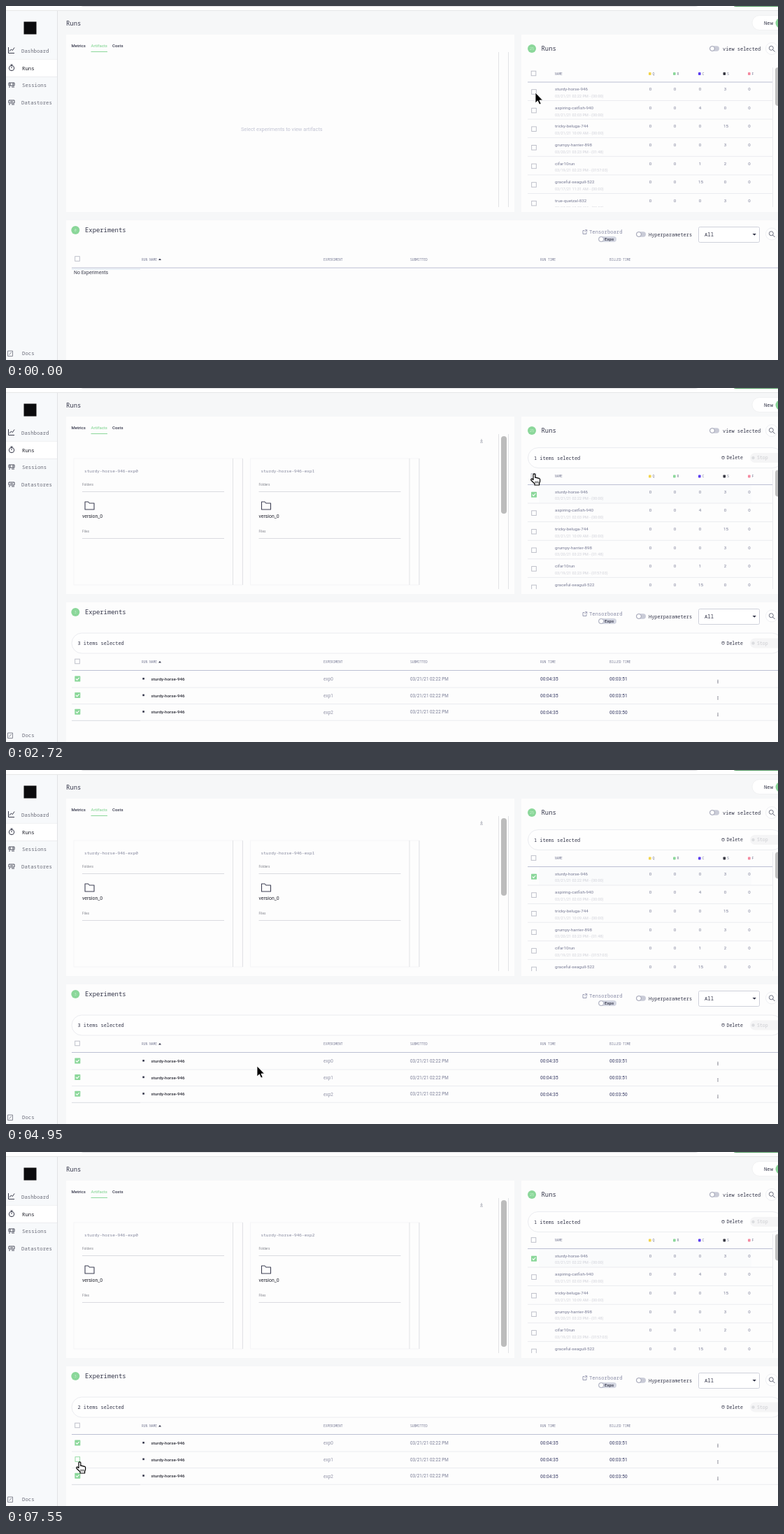
Recreate the animation shown at these times as an HTML page. Size 1104 by 507 pixels, loop 8000 ms.

```html
<!DOCTYPE html>
<html lang="en">
<head>
<meta charset="utf-8">
<style>
  html, body { margin: 0; width: 100%; height: 100%; overflow: hidden; background: #f6f7f8; }
  svg { display: block; width: 1104px; height: 507px; }
  text { font-family: Roboto, Inter, sans-serif; white-space: pre; }
  .m { font-family: "Noto Sans Mono", "DejaVu Sans Mono", monospace; }
  .b { font-weight: 500; }
  .c { text-anchor: middle; }
</style>
</head>
<body>
<svg id="stage" viewBox="0 0 1104 507"></svg>
<script>
const INK = '#34364a', SOFT = '#787b95', PALE = '#cfd0d8', GREEN = '#8bd79a', EDGE = '#ebecf0';
const STEP = 117.65, LOOP = 8000;

// Drawing helpers; text is placed by its vertical centre.
const text = (x, y, s, size, fill = INK, cls = '', id = '') =>
  `<text id="${id}" x="${x}" y="${y + size * .36}" font-size="${size}" fill="${fill}" class="${cls}">${s}</text>`;
const rect = (x, y, w, h, fill, extra = '') =>
  `<rect x="${x}" y="${y}" width="${w}" height="${h}" fill="${fill}" ${extra}/>`;
const path = (d, stroke, w = 1, fill = 'none', extra = '') =>
  `<path d="${d}" stroke="${stroke}" stroke-width="${w}" fill="${fill}" ${extra}/>`;
const circle = (x, y, r, fill, extra = '') => `<circle cx="${x}" cy="${y}" r="${r}" fill="${fill}" ${extra}/>`;
const hline = (x, y, x2, color, w = 1) => path(`M${x} ${y}H${x2}`, color, w);
const vline = (x, y, y2, color, w = 1) => path(`M${x} ${y}V${y2}`, color, w);
const group = (id, body, extra = '') => `<g id="${id}" ${extra}>${body}</g>`;
const box = (x, y, color = '#b7b9c4') => rect(x - 3.3, y - 3.3, 6.6, 6.6, '#fff', `stroke="${color}" stroke-width=".9"`);
const ticked = (x, y) => rect(x - 4, y - 4, 8, 8, GREEN, 'rx=".6"') +
  path(`M${x - 2.3} ${y}l1.7 1.7 3-3.4`, '#fff', 1.1);
const toggle = (x, y) => rect(x, y - 3.7, 14, 7.4, '#c9cbd7', 'rx="3.7"') +
  circle(x + 4, y, 3.4, '#fff', 'stroke="#8d90a5" stroke-width=".8"');
const search = y => circle(1095, y, 8.5, '#fff', 'stroke="#eff0f3"') +
  circle(1094.3, y - .7, 3, 'none', 'stroke="#5d6072" stroke-width=".9"') +
  path(`M1096.5 ${y + 1.5}l3 3`, '#5d6072');
const badge = (x, y, r, id, s) => circle(x, y, r, GREEN) + text(x, y, s, 5, '#c9f2d0', 'm c', id);

function sidebar() {
  const items = [['Dashboard', 22, 64], ['Runs', 23, 89], ['Sessions', 23, 113.5], ['Datastores', 22, 138], ['Docs', 23, 497.5]];
  const icon = '#3b3d4d';
  return rect(0, 7, 73, 500, '#f7f9fb') + vline(73.5, 7, 507, '#e1e2e5') +
    rect(0, 76, 73, 25, '#fff') + hline(0, 101.5, 73, EDGE) + hline(0, 76.5, 73, '#f1f2f4') +
    rect(25.5, 22.5, 18, 18, '#0c0c0e') +
    items.map(([s, x, y], i) => text(x, y, s, 7.3, i == 1 ? '#1e1f29' : '#6a6c79', 'm')).join('') +
    path('M3.5 59V67.5H12M5 65l2.4-3 2 1.5 2.6-4', icon) +
    circle(8, 89, 3.7, 'none', `stroke="${icon}"`) + path('M6.5 84h3M8 84v1.5M8 89V86.7', icon) +
    path('M4 110h8v4h-8zM4 116h2m2 0h4M6 110v4m4-4v4', icon, .9) +
    path('M4 135h8v4h-8zM4 141h2m2 0h4M6 137h4', icon, .9) +
    path('M2.5 494h7v7.5h-7zM4.5 499.5l3.5-4', '#7b7d89', .9);
}

function header() {
  return rect(0, 0, 1104, 6, '#fff') + hline(0, 6.5, 1104, '#e6e7e8') +
    path('M107-1q1 1.5 4 1.5H985q4 0 5-1.5', '#dcdddf') + path('M1040-1q1 1.5 4 1.5H1104', '#4f9a5e') +
    text(86, 24.5, 'Runs', 8.9, INK, 'm') +
    rect(1067, 13.5, 60, 21, '#fff', 'rx="10.5" stroke="#f1f2f3"') +
    text(1084, 24.5, 'New', 7.2, INK, 'm b') + circle(1108, 24.5, 7.5, GREEN);
}

function card(x, label, id) {
  const rule = y => hline(x + 12, y, x + 215, '#dadbe0');
  return rect(x, 101, 241, 181, '#fdfdfd', 'stroke="#f5f5f7"') +
    vline(x + 227.5, 101, 282, '#e2e3e6') + vline(x + 241.5, 101, 282, '#e2e3e6') +
    text(x + 15, 119, label, 6.1, '#84879d', 'm', id) +
    text(x + 12, 138.5, 'Folders', 4.8, '#85878f') + rule(148.5) +
    path(`M${x + 16} 163h4.5l1.8 2h6.7v9h-13z`, '#3f4155', 1.1, 'none', 'stroke-linejoin="round"') +
    text(x + 12, 183.7, 'version_0', 6.9, '#22232e') +
    text(x + 12, 205.5, 'Files', 4.8, '#85878f') + rule(215.5);
}

function artifacts() {
  return rect(86, 41, 641, 254, '#fdfdfd') +
    text(93.5, 57, 'Metrics', 6, INK, 'b') + text(121.5, 57, 'Artifacts', 6, GREEN, 'b') +
    text(152, 57, 'Costs', 6, INK, 'b') + hline(121.5, 65.5, 145, GREEN) +
    vline(704.5, 66, 288, '#e2e3e6') + vline(718.5, 66, 288, '#e2e3e6') +
    group('empty', text(336, 176.5, 'Select experiments to view artifacts', 7.35, '#c1c3d3')) +
    group('cards', card(97, 'sturdy-horse-946-exp0', '') + card(349.5, 'sturdy-horse-946-exp1', 'second') +
      path('M680 73v3.5m-1.5-1.5l1.5 1.5 1.5-1.5M678 78h4', '#9a9caa', .8) +
      rect(708, 69, 8, 111, '#bcbcbc', 'rx="4" id="thumb"'));
}

const selectionBar = (x, y, w, textX, id, n) =>
  rect(x, y, w, 29, '#fefefe', `rx="14.5" stroke="${EDGE}"`) +
  text(textX, y + 14.7, `${n} items selected`, 6.9, INK, 'm', id) +
  circle(1025.5, y + 14.5, 1.8, 'none', `stroke="${INK}" stroke-width=".7"`) + hline(1023.5, y + 12.7, 1027.5, INK, .6) +
  text(1030.5, y + 14.2, 'Delete', 6.5, INK, 'm') +
  rect(1064, y + 7.5, 50, 14, '#f5f5f6', 'rx="7"') +
  circle(1068.5, y + 14.5, 2.2, '#dcdde0') + text(1074, y + 14.2, 'Stop', 6.5, '#cbccd0', 'm');

const RUNS = [
  ['sturdy-horse-946', '03/21/21 02:22 PM - (00:00)', 0, 0, 0, 3, 0],
  ['aspiring-catfish-940', '03/21/21 02:03 PM - (00:00)', 0, 0, 4, 0, 0],
  ['tricky-beluga-744', '03/21/21 10:09 AM - (00:00)', 0, 0, 0, 15, 0],
  ['grumpy-harrier-898', '03/20/21 03:23 PM - (01:48)', 0, 0, 0, 3, 0],
  ['cifar10run', '03/19/21 02:23 PM - (0157:03)', 0, 0, 1, 2, 0],
  ['graceful-seagull-522', '03/17/21 11:31 AM - (00:00)', 0, 0, 15, 0, 0],
  ['true-quetzal-832', '03/17/21 10:58 AM - (00:00)', 0, 0, 0, 3, 0]
];

function runRow([name, date, ...counts], i) {
  const y = 119 + i * 26.6;
  return (i ? '' : rect(762, 109.5, 304, 26, '#fafbfc', 'id="hover"')) +
    hline(746, y + 16.5, 1096, EDGE) +
    (i ? box(755, y + 4) : group('firstBox', '')) +
    text(785, y, name, 6.25, SOFT) + text(785, y + 10, date, 5.5, PALE) +
    counts.map((n, k) => text([921.5, 956.5, 992.5, 1028.5, 1063][k] + (n > 9 ? 1 : 0), y, n, 6.2, SOFT, 'c')).join('');
}

function runs() {
  const legend = [['Q', 919, '#f3d44c'], ['R', 954, GREEN], ['C', 990, '#5b3df0'], ['S', 1025.5, '#3a3b45'], ['F', 1061, '#f58aa0']];
  return rect(737, 41, 367, 254, '#fdfdfd') + badge(752, 61, 6, '', '25') +
    text(765.5, 61, 'Runs', 8.9, INK, 'm') + toggle(1006, 61) +
    text(1025, 61.5, 'view selected', 6.95, INK, 'm') + search(61) +
    `<clipPath id="clip"><rect x="737" y="80" width="367" height="208"/></clipPath>` +
    group('', group('runTable',
      RUNS.map(runRow).join('') + box(754.5, 96.5) + text(785, 97, 'NAME', 4.5, SOFT, 'm b') +
      legend.map(([s, x, c]) => rect(x, 95, 3.6, 4, c, 'rx=".8"') + text(x + 5.5, 97, s, 5, SOFT, 'm')).join('') +
      hline(746, 109, 1096, '#bcc0d4', 1.2) + vline(1096.5, 88, 288, EDGE) +
      rect(1100, 88, 8, 55, '#c1c1c1', 'rx="4" id="runThumb"')), 'clip-path="url(#clip)"') +
    group('runBar', selectionBar(746.5, 85.5, 364, 755, '', 1));
}

function expRow(i) {
  const y = 417 + i * 23.6;
  return (i == 1 ? group('midBox', '') : ticked(102.3, y - .5)) +
    rect(195.3, y - 2, 2.6, 2.6, INK) + text(207.5, y, 'sturdy-horse-946', 6.25, '#2a2b36', 'b') +
    text(454, y, 'exp' + i, 6.5, '#9496aa') + text(578, y, '03/21/21 02:22 PM', 6.3, SOFT) +
    text(764, y, '00:04:35', 6.5, '#5c5f80', 'b') + text(863, y, i < 2 ? '00:03:51' : '00:03:50', 6.5, '#5c5f80', 'b') +
    [1.6, 3.4, 5.2].map(d => circle(1018, y + d, .6, INK)).join('') +
    hline(94, y + 12, 1104, EDGE);
}

function experiments() {
  const columns = [['RUN NAME', 194], ['EXPERIMENT', 454], ['SUBMITTED', 578], ['RUN TIME', 764], ['BILLED TIME', 863]];
  return rect(86, 307, 1018, 200, '#fdfdfd') + badge(99.3, 321, 6, 'expCount', '0') +
    text(113, 321, 'Experiments', 8.9, INK, 'm') +
    path('M827.5 321.5h-2.5v5h5V324M828 320.7h2.7v2.7M830.7 320.7l-3.2 3.2', '#8487a3', .8) +
    text(834, 323.5, 'Tensorboard', 7.2, '#888ba6', 'm') +
    rect(847, 330, 26, 8, '#d3d6e1', 'rx="4"') + circle(851.2, 334, 3.5, '#fff', 'stroke="#8d90a5" stroke-width=".7"') +
    text(856, 334, 'Exps', 6.2, INK, 'b') +
    toggle(901, 327) + text(919, 327.5, 'Hyperparameters', 6.9, INK, 'm') +
    rect(990.5, 316.5, 87, 22, '#fff', 'rx="2" stroke="#cfd1db"') + text(999, 327.5, 'All', 7.2, INK, 'm') +
    `<path d="M1067.5 326h5.4l-2.7 2.8z" fill="${INK}"/>` + search(326.5) +
    group('expTable', box(102, 362) + columns.map(([s, x]) => text(x, 363, s, 4.6, SOFT, 'm b')).join('') +
      `<path d="M218 364h4l-2-2.4z" fill="${INK}"/>` +
      hline(94, 375, 1104, '#bcc0d4', 1.2)) +
    group('noExps', hline(94, 377, 192, '#dbe8f3') + text(97, 381.5, 'No Experiments', 6.95, '#3b3d4d')) +
    group('expRows', selectionBar(94, 351, 1016, 102.5, 'expText', 3) + [0, 1, 2].map(expRow).join('') +
      hline(94, 476.5, 192, '#dfe1e5'));
}

const pointers =
  group('arrow', path('M0 0V15L3.4 11.8 5.7 17 8.2 16 5.9 11H10.5Z', '#fff', .8, '#000')) +
  group('hand', path('M4 1.8q1.4-1.8 2.8 0V6.5q1-.7 2.2.3 1.1-.5 2 .5 2-.4 2.6 1.5V12l-1 2.5V17H6V15L1 10.2q-.8-2 1-2.2L4 9.5Z', '#000', 1.2, '#fff', 'stroke-linejoin="round"') +
    path('M7 11.5v3M9 11.5v3M11 11.5v3', '#000', .8));

const stage = document.getElementById('stage');
stage.innerHTML = rect(0, 0, 1104, 507, '#f6f7f8') + header() + sidebar() + artifacts() + runs() + experiments() + pointers;
const $ = id => document.getElementById(id);
const show = (id, on) => $(id).setAttribute('visibility', on ? 'visible' : 'hidden');

// Pointer route: step, x, y.
const ROUTE = [
  [0, 757, 124], [2, 759, 125], [4, 759, 125], [6, 774, 125], [8, 755, 122], [10, 763, 124], [13, 763, 124],
  [17, 750, 120], [19, 750, 122], [25, 750, 122], [29, 769, 148], [31, 762, 159], [32, 750, 168],
  [34, 745, 185], [36, 714, 236], [37, 695, 252], [38, 560, 330], [39, 406, 414], [40, 398, 418], [41, 398, 418],
  [43, 320, 430], [45, 165, 430], [46, 127, 423], [48, 105, 420], [50, 99, 421], [54, 99, 421],
  [57, 99, 446], [58, 99, 446], [60, 100, 443], [99, 100, 443]
];

function pointerAt(n) {
  const i = ROUTE.findIndex(k => k[0] > n), [a, x, y] = ROUTE[i - 1], [b, x2, y2] = ROUTE[i];
  const p = (n - a) / (b - a);
  return [x + (x2 - x) * p, y + (y2 - y) * p];
}

function draw(ms) {
  const n = Math.floor((ms + 8) / STEP);
  const picked = n >= 22, dropped = n >= 63;
  const [x, y] = pointerAt(n);
  const hand = n >= 16 && n < 33 || n >= 45;
  for (const [id, on] of [['arrow', !hand], ['hand', hand]]) {
    show(id, on);
    $(id).setAttribute('transform', `translate(${x} ${y})`);
  }
  for (const id of ['cards', 'runBar', 'expRows']) show(id, picked);
  for (const id of ['empty', 'noExps']) show(id, !picked);
  show('hover', n >= 16);
  for (const id of ['runTable', 'expTable']) $(id).setAttribute('transform', `translate(0 ${picked ? 29.5 : 0})`);
  $('runThumb').setAttribute('height', picked ? 38 : 55);
  $('firstBox').innerHTML = picked ? ticked(755, 123.2) : box(755, 123, n >= 16 ? GREEN : undefined);
  $('midBox').innerHTML = dropped ? box(102.3, 440, GREEN) : ticked(102.3, 440);
  $('expCount').textContent = picked ? 3 : 0;
  $('expText').textContent = `${dropped ? 2 : 3} items selected`;
  $('second').textContent = 'sturdy-horse-946-exp' + (dropped ? 2 : 1);
  $('thumb').setAttribute('height', dropped ? 210 : 111);
  $('thumb').setAttribute('fill', n == 36 || n == 37 ? '#7d7d7d' : '#bcbcbc');
}

const start = performance.now();
function tick() {
  draw((performance.now() - start) % LOOP);
  requestAnimationFrame(tick);
}
tick();
</script>
</body>
</html>
```
